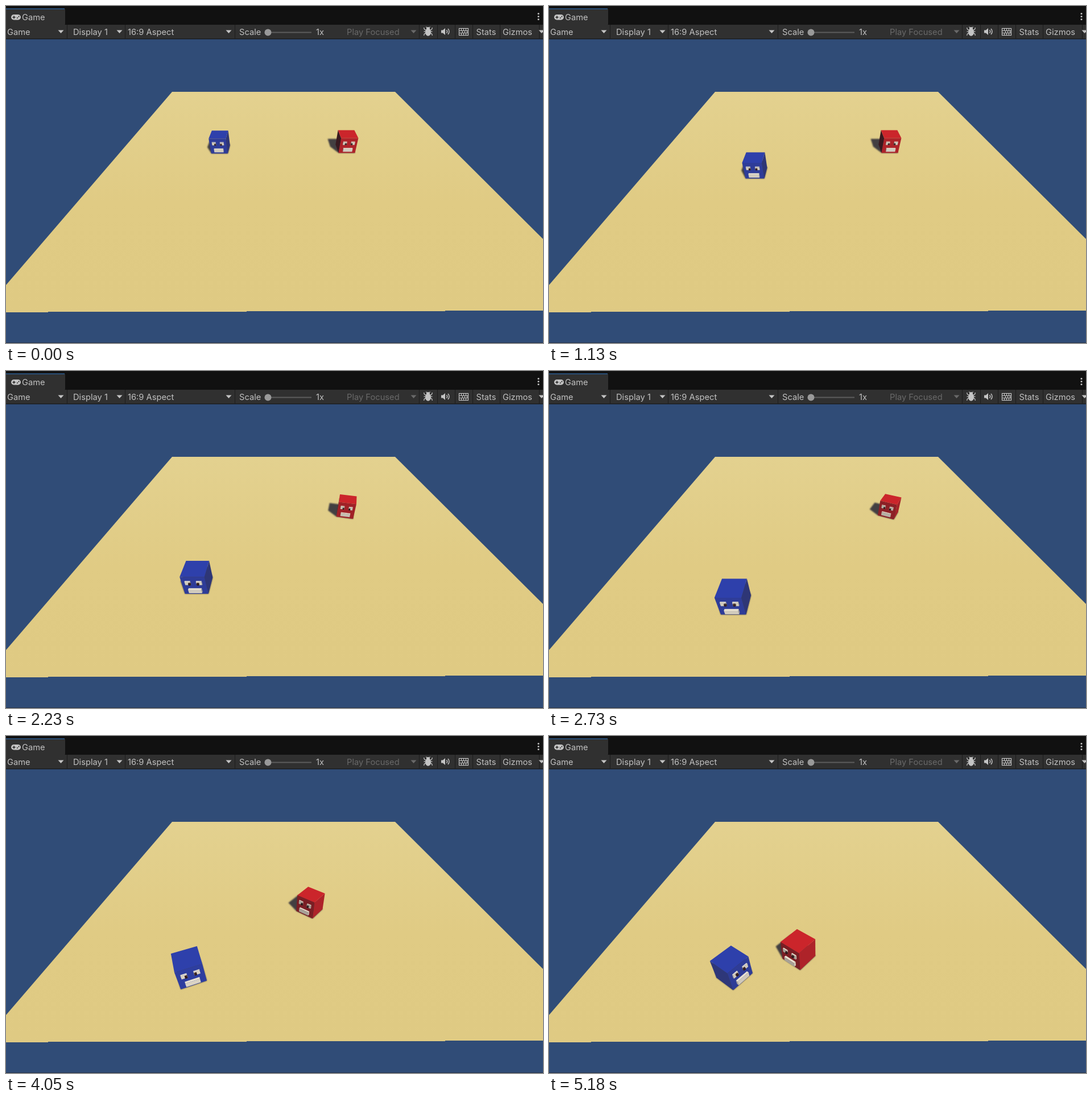
Recreate the animation shown at these times as an HTML page with a canvas. Size 944 by 593 pixels, loop 5240 ms.

```html
<!DOCTYPE html>
<html lang="en">
<head>
<meta charset="utf-8">
<title>Game view</title>
<style>
html, body { margin: 0; width: 100%; height: 100%; overflow: hidden; background: #111; }
canvas { display: block; width: 944px; height: 593px; }
</style>
</head>
<body>
<canvas id="stage" width="944" height="593"></canvas>
<script>
const ctx = document.getElementById('stage').getContext('2d');
const LOOP = 5240, STEP = 36.22, LAST = 143, RAD = Math.PI / 180;

// Camera: 60 degree field of view, pitched 40 degrees down
const CX = 472.5, CY = 325, FOCAL = 460, CAM_H = 4.14;
const SIN = Math.sin(40 * RAD), COS = Math.cos(40 * RAD);
const SIZE = 0.49, HALF = SIZE / 2;
const LIGHT = [0.28, 0.76, -0.58];
const SHADOW = [-0.19, 0.36];

// Colour in the dark and in full light
const BLUE = [[46, 46, 75], [46, 64, 171]];
const RED = [[56, 25, 31], [203, 37, 43]];
const WHITE = [[112, 108, 104], [233, 226, 209]];
const PUPIL = [[18, 12, 14], [48, 24, 26]];
const INK = '#c4c4c4', PANEL = '#303030', GAP = '#1c1c1c', FADED = '#696969';

// Smooth start and stop between two times
function ease(t, from, to) {
  const u = Math.max(0, Math.min(1, (t - from) / (to - from)));
  return u * u * (3 - 2 * u);
}

function project(x, y, z) {
  const drop = CAM_H - y, depth = z * COS + drop * SIN;
  return [CX + FOCAL * x / depth, CY - FOCAL * (z * SIN - drop * COS) / depth];
}

function trace(pts) {
  ctx.beginPath();
  pts.forEach(p => ctx.lineTo(p[0], p[1]));
}

function polygon(pts, fill) {
  trace(pts);
  ctx.closePath();
  ctx.fillStyle = fill;
  ctx.fill();
}

function line(pts, width) {
  trace(pts);
  ctx.lineWidth = width;
  ctx.strokeStyle = INK;
  ctx.stroke();
}

function rect(x, y, w, h, fill) {
  ctx.fillStyle = fill;
  ctx.fillRect(x, y, w, h);
}

function oval(x, y, rx, ry, fill) {
  ctx.beginPath();
  ctx.ellipse(x, y, rx, ry, 0, 0, 7);
  ctx.fillStyle = fill;
  ctx.fill();
}

const cross = (a, b, c) => (b[0] - a[0]) * (c[1] - a[1]) - (b[1] - a[1]) * (c[0] - a[0]);

function shade([dark, lit], normal) {
  const dot = normal.reduce((sum, v, i) => sum + v * LIGHT[i], 0);
  const u = Math.min(1, Math.max(0, dot / LIGHT[1])) ** 0.8;
  return `rgb(${dark.map((v, i) => Math.round(v + (lit[i] - v) * u))})`;
}

// Corner numbers use bit 1 for right, 2 for top, 4 for back
const FACES = [
  { at: [5, 7, 6, 4], n: [0, 0, 1] },
  { at: [4, 6, 2, 0], n: [-1, 0, 0] },
  { at: [1, 3, 7, 5], n: [1, 0, 0] },
  { at: [2, 6, 7, 3], n: [0, 1, 0] },
  { at: [0, 2, 3, 1], n: [0, 0, -1] }
];

function turn(yaw, x, z) {
  const s = Math.sin(yaw), c = Math.cos(yaw);
  return [x * c + z * s, z * c - x * s];
}

function drawBox(body, x0, x1, y0, y1, z0, z1, ramp) {
  const pts = [];
  for (let i = 0; i < 8; i++) {
    const [x, z] = turn(body.yaw, i & 1 ? x1 : x0, i & 4 ? z1 : z0);
    pts.push(project(body.x + x, i & 2 ? y1 : y0, body.z + z));
  }
  for (const face of FACES) {
    const quad = face.at.map(i => pts[i]);
    if (cross(quad[0], quad[1], quad[2]) <= 0) continue;
    const [nx, nz] = turn(body.yaw, face.n[0], face.n[2]);
    polygon(quad, shade(ramp, [nx, face.n[1], nz]));
  }
}

function hull(pts) {
  const chain = list => {
    const out = [];
    for (const p of list) {
      while (out.length > 1 && cross(out[out.length - 2], out[out.length - 1], p) <= 0) out.pop();
      out.push(p);
    }
    return out.slice(0, -1);
  };
  pts.sort((a, b) => a[0] - b[0] || a[1] - b[1]);
  return chain(pts).concat(chain(pts.slice().reverse()));
}

function drawShadow(body) {
  const pts = [];
  for (const sx of [-HALF, HALF]) for (const sz of [-HALF, HALF]) for (const k of [0, 1]) {
    const [x, z] = turn(body.yaw, sx, sz);
    pts.push(project(body.x + x + k * SHADOW[0], 0, body.z + z + k * SHADOW[1]));
  }
  ctx.save();
  ctx.filter = 'blur(1.2px)';
  polygon(hull(pts), 'rgba(36,36,52,0.84)');
  ctx.restore();
}

function drawBody(body) {
  drawBox(body, -HALF, HALF, 0, SIZE, -HALF, HALF, body.ramp);
  const part = (x, w, y, h, out, ramp) =>
    drawBox(body, x - w / 2, x + w / 2, y, y + h, -HALF - out, -HALF, ramp);
  for (const side of [-1, 1]) {
    part(side * 0.115, 0.11, 0.285, 0.095, 0.025, WHITE);
    part(side * 0.085, 0.045, 0.28, 0.045, 0.03, PUPIL);
  }
  part(0, 0.27, 0.065, 0.105, 0.045, WHITE);
}

function label(text, x, y, fill = '#c0c0c0') {
  ctx.fillStyle = fill;
  ctx.fillText(text, x, y);
}

function drawGamepad() {
  ctx.beginPath();
  ctx.roundRect(9, 15, 17, 9.5, 4.7);
  ctx.fillStyle = INK;
  ctx.fill();
  rect(11.5, 19, 5, 1.6, PANEL);
  rect(13.2, 17.3, 1.6, 5, PANEL);
  oval(20, 21, 1.1, 1.1, PANEL);
  oval(22.5, 18.6, 1.1, 1.1, PANEL);
}

function drawBug(x, y) {
  for (const s of [-1, 1]) {
    for (const k of [-1, 0, 1])
      line([[x + s * 3, y + k * 2], [x + s * 6.5, y + k * 4], [x + s * 7.5, y + k * 7]], 1.2);
    line([[x + s, y - 5], [x + s * 3.5, y - 8.5]], 1.2);
  }
  oval(x, y + 1, 5, 6.8, INK);
  oval(x, y - 5, 3, 3, INK);
}

function drawSpeaker(x, y) {
  polygon([[x - 7, y - 2.6], [x - 4, y - 2.6], [x, y - 6], [x, y + 6],
    [x - 4, y + 2.6], [x - 7, y + 2.6]], INK);
  for (const r of [4, 7.5]) {
    ctx.beginPath();
    ctx.arc(x - 0.5, y, r, -0.75, 0.75);
    ctx.lineWidth = 1.5;
    ctx.strokeStyle = INK;
    ctx.stroke();
  }
}

function drawKeyboard(x, y) {
  ctx.strokeStyle = INK;
  ctx.lineWidth = 1.2;
  ctx.strokeRect(x, y, 16, 12);
  for (let row = 0; row < 3; row++) {
    const top = y + row * 4;
    line([[x, top], [x + 16, top]], 1);
    for (let k = 4 + row % 2 * 2; k < 16; k += 4) line([[x + k, top], [x + k, top + 4]], 1);
  }
}

function drawBar() {
  rect(0, 0, 944, 33, '#111111');
  ctx.beginPath();
  ctx.roundRect(-4, 4, 108, 30, 3);
  ctx.fillStyle = PANEL;
  ctx.fill();
  rect(0, 4, 103, 2, '#294f77');
  rect(0, 33, 944, 24, PANEL);
  for (const x of [107, 209, 402, 726, 758, 789, 820, 868, 937]) rect(x, 33, 1, 24, GAP);
  rect(0, 57, 944, 1.5, GAP);
  ctx.font = '14.7px Inter, "Liberation Sans", sans-serif';
  label('Game', 28, 24.7);
  label('Game', 2, 50.6);
  label('Display 1', 118, 50.6);
  label('16:9 Aspect', 214, 50.6);
  label('Scale', 410, 50.6);
  label('1x', 545, 50.6);
  label('Play Focused', 599, 50.6, FADED);
  label('Stats', 826.5, 50.6);
  label('Gizmos', 873, 50.6);
  for (const x of [96.5, 199.5, 391.5, 716.5, 941.5])
    polygon([[x - 5, 42.5], [x + 5, 42.5], [x, 48]], x === 716.5 ? FADED : INK);
  rect(460, 45.5, 77, 2, '#5c5c5c');
  oval(460.5, 46.5, 6, 6, '#999999');
  drawGamepad();
  drawBug(742, 45);
  drawSpeaker(772, 45);
  drawKeyboard(796.5, 39.5);
  for (let i = 0; i < 3; i++) oval(936, 13.5 + i * 5, 1.5, 1.5, INK);
}

function drawGround() {
  rect(0, 58, 944, 535, '#304c77');
  const sand = ctx.createLinearGradient(0, 151, 0, 539);
  sand.addColorStop(0, '#e3d18f');
  sand.addColorStop(0.5, '#e0cb84');
  sand.addColorStop(1, '#dfca83');
  polygon([[292, 151], [684, 151], [944, 410], [944, 536], [0, 536], [0, 491]], sand);
  // the near edge falls one pixel every 349
  for (let i = 0; i < 3; i++) rect(0, 538 - i, 74 + 349 * i, 1, sand);
  rect(0, 592, 944, 1, '#26354c');
}

function render(now) {
  const t = STEP * Math.min(LAST, Math.floor((now % LOOP + 10) / STEP));
  const run = 4.08 * ease(t, 3040, 5100), heading = 38.4 * RAD;
  const red = {
    x: 2.14 - run * Math.sin(heading),
    z: 6.93 - run * Math.cos(heading),
    yaw: heading * ease(t, 1340, 3420),
    ramp: RED
  };
  const blue = {
    x: -1.637,
    z: 6.925 - 3.67 * ease(t, -160, 3110),
    yaw: -54.3 * RAD * ease(t, 3070, 5220),
    ramp: BLUE
  };
  drawGround();
  drawBar();
  const bodies = [red, blue].sort((a, b) => b.z - a.z);
  bodies.forEach(drawShadow);
  bodies.forEach(drawBody);
}

const start = performance.now();
function tick() {
  render(performance.now() - start);
  requestAnimationFrame(tick);
}
tick();
</script>
</body>
</html>
```
